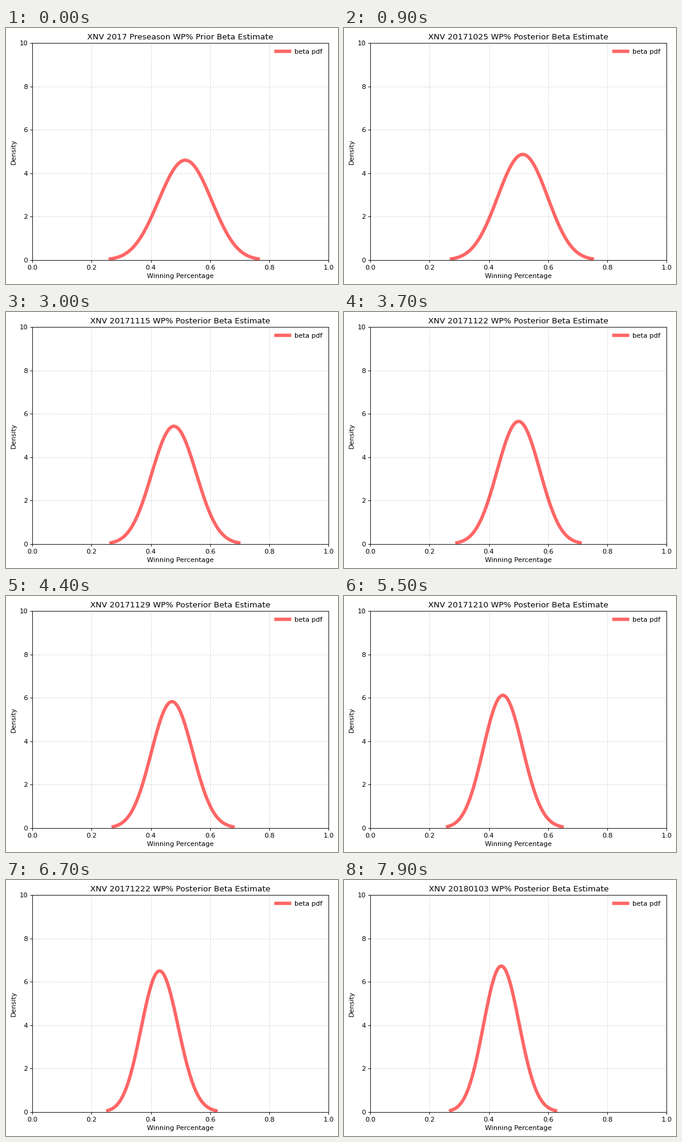
Write a matplotlib script that moves like this. It is 556x428 px and loops after 8000 ms.

```python
from math import lgamma

import numpy as np
import matplotlib.pyplot as plt
from matplotlib.animation import FuncAnimation

W, H, DPI = 556, 428, 80
FRAMES, INTERVAL = 80, 100
TEAM = "XNV"
START = np.datetime64("2017-10-16")

# Beta prior, then (day, total) where the pace of wins and losses changes
PRIOR_A, PRIOR_B = 17.36, 16.34
WIN_PACE = [(-1, 0), (9, 2), (16, 5), (31, 5),
            (37, 8), (42, 8), (63, 11), (78, 14)]
LOSS_PACE = [(-3, 0), (11, 3), (16, 3), (22, 6), (32, 9), (36, 9),
             (46, 13), (49, 13), (61, 19), (67, 21), (76, 23)]

GRID = np.linspace(0, 1, 8001)[1:-1]


def games(day, pace):
    """Whole games so far, evenly spaced between the pace points."""
    return np.floor(np.interp(day, *zip(*pace)) + 1e-9)


def beta_pdf(x, a, b):
    log_norm = lgamma(a + b) - lgamma(a) - lgamma(b)
    return np.exp(log_norm + (a - 1) * np.log(x) + (b - 1) * np.log1p(-x))


def beta_curve(a, b, tail=0.001):
    """Density between the lower and upper tail quantiles."""
    cdf = np.cumsum(beta_pdf(GRID, a, b))
    lo, hi = np.interp([tail, 1 - tail], cdf / cdf[-1], GRID)
    x = np.linspace(lo, hi, 100)
    return x, beta_pdf(x, a, b)


def title_text(day):
    if day == 0:
        return f"{TEAM} 2017 Preseason WP% Prior Beta Estimate"
    date = str(START + day).replace("-", "")
    return f"{TEAM} {date} WP% Posterior Beta Estimate"


fig = plt.figure(figsize=(W / DPI, H / DPI), dpi=DPI, facecolor="white")
ax = fig.add_axes([44.2 / W, 40.25 / H, 496 / W, 362.4 / H])
line, = ax.plot([], [], "r-", lw=5, alpha=0.6, label="beta pdf")
ax.set(xlim=(0, 1), ylim=(0, 10),
       xlabel="Winning Percentage", ylabel="Density")
ax.grid(linestyle="--", alpha=0.5)
ax.legend(loc="upper right", frameon=False)
title = ax.set_title("")


def update(day):
    a = PRIOR_A + games(day, WIN_PACE)
    b = PRIOR_B + games(day, LOSS_PACE)
    line.set_data(*beta_curve(a, b))
    title.set_text(title_text(day))
    return line, title


anim = FuncAnimation(fig, update, frames=FRAMES, interval=INTERVAL,
                     repeat=True, repeat_delay=0)
plt.show()
```
